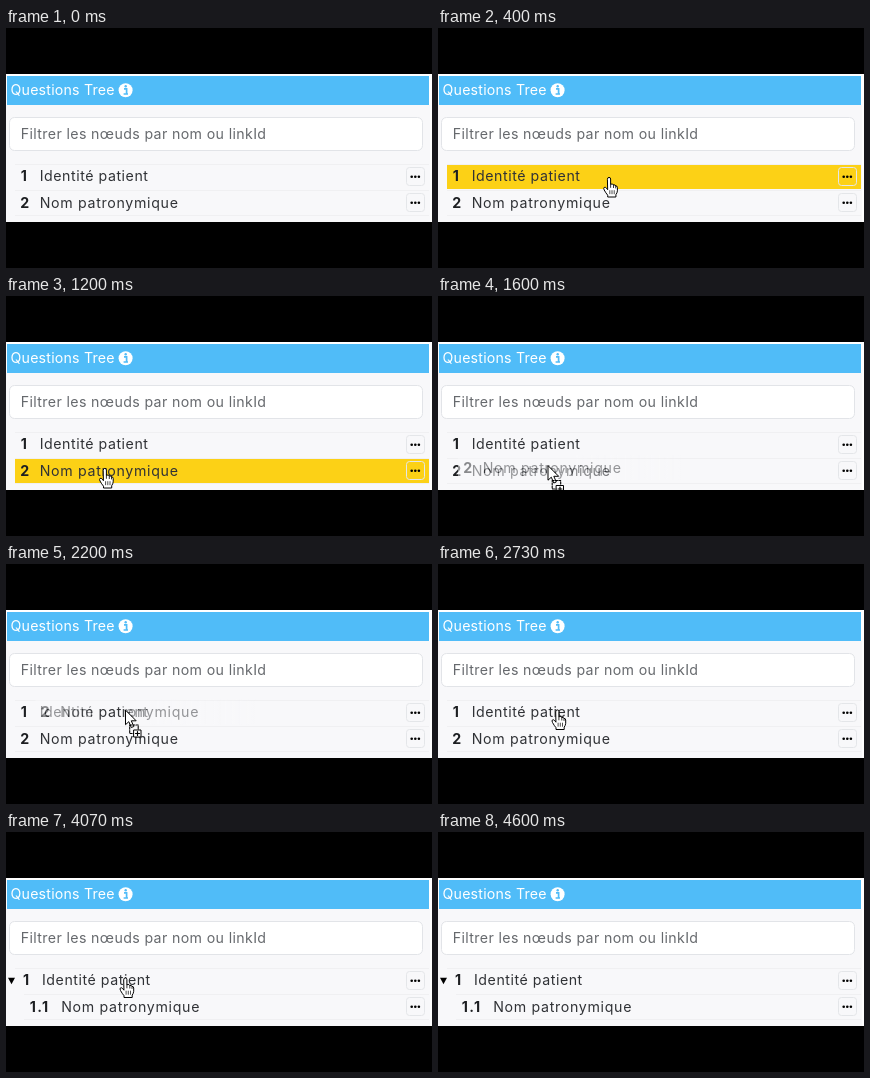
These frames come from a looping animation (426 px wide and 240 px high, 4670 ms). An HTML page:

```html
<!DOCTYPE html>
<html lang="fr">
<head>
<meta charset="utf-8">
<title>Questions Tree</title>
<style>
html, body { margin: 0; width: 100%; height: 100%; overflow: hidden; background: #000; }
svg { display: block; width: 100vw; height: 100vh; }
text { font-family: Inter, "Open Sans", sans-serif; font-size: 14.2px; fill: #303236; white-space: pre; }
.num { font-weight: 700; fill: #1d1f22; }
.first { letter-spacing: .54px; }
.second { letter-spacing: .68px; }
.tip { font: 11.3px "Liberation Sans", Arial, sans-serif; fill: #fff; stroke: #fff; stroke-width: .25px; }
.line { stroke: #f0f0f2; fill: none; }
.button { fill: none; stroke: #e4e6e9; }
.pen { fill: #fff; stroke: #000; stroke-linejoin: round; stroke-linecap: round; }
</style>
</head>
<body>
<svg viewBox="0 0 426 240">
  <defs>
    <clipPath id="panel"><rect y="46" width="426" height="148"/></clipPath>
    <linearGradient id="fade">
      <stop offset="0" stop-color="#f8f8fa"/>
      <stop offset=".5" stop-color="#f8f8fa"/>
      <stop offset="1" stop-color="#f8f8fa" stop-opacity="0"/>
    </linearGradient>
    <g id="more">
      <rect class="button" x="400.5" y="139.5" width="18" height="18" rx="3"/>
      <circle cx="405.7" cy="148.8" r="1.3"/>
      <circle cx="409.3" cy="148.8" r="1.3"/>
      <circle cx="412.9" cy="148.8" r="1.3"/>
    </g>
  </defs>
  <rect width="426" height="240"/>
  <g clip-path="url(#panel)">
    <rect y="46" width="426" height="148" fill="#fff"/>
    <rect y="77" width="424" height="117" fill="#f8f8fa"/>
    <rect x="1" y="48" width="422" height="29" fill="#50bcf8"/>
    <text x="4.5" y="67" style="fill:#fff;letter-spacing:.2px">Questions Tree</text>
    <circle cx="119.6" cy="62.3" r="7" fill="#fff"/>
    <path d="M118 60.8h2.6v5M117.6 66h4.4" fill="none" stroke="#50bcf8" stroke-width="1.7"/>
    <circle cx="119.7" cy="58.2" r="1.2" fill="#50bcf8"/>
    <rect x="3.5" y="89.5" width="413" height="33" rx="5" fill="#fff" stroke="#e2e4e8"/>
    <text x="14.8" y="110.5" style="fill:#66696d;letter-spacing:.36px">Filtrer les nœuds par nom ou linkId</text>

    <rect id="hover" x="9" width="414" height="25" fill="#fcd116"/>
    <path id="lines" class="line"/>
    <path id="caret" d="M2 145.7h7l-3.5 6.6z"/>
    <text id="num1" class="num" y="153.3">1</text>
    <text id="name1" class="first" y="153.3">Identité patient</text>
    <text id="num2" class="num" y="179.5"></text>
    <text id="name2" class="second" y="179.5">Nom patronymique</text>
    <use href="#more"/>
    <use href="#more" y="26"/>

    <g id="ghost" opacity=".5">
      <rect x="9" y="162" width="225" height="25" fill="url(#fade)"/>
      <text class="num" x="14.3" y="179.5">2</text>
      <text class="second" x="33.7" y="179.5">Nom patronymique</text>
    </g>

    <g id="tip">
      <rect x="172.5" y="168.5" width="87" height="19.5" rx="3.5" fill="#636363"/>
      <text class="tip" x="179.3" y="182">Identité patient</text>
    </g>

    <g id="hand" class="pen">
      <path d="M-1.8 1Q-1.8-.6-.2-.6T1.4 1V6.2Q3.9 5.4 4.3 7Q6.2 6.3 6.5 8Q8.2 7.7 8.2 9.5V12.8Q8 15 6.7 16.6V19H-1.5V17.2Q-3.4 15-5 12Q-6 10.2-5 9.4Q-3.9 8.8-2.7 10.2L-1.8 11.4Z"/>
      <path d="M1.4 6.2V9.4M4.3 7V9.6M6.5 8V10" fill="none" stroke-width=".8"/>
      <path d="M.6 12.6V15.8M2.8 12.6V15.8M5 12.6V15.8" fill="none" stroke-width=".7"/>
    </g>
    <g id="arrow" class="pen">
      <path d="M0 0V14.2L3.3 11.2 5.8 17 8.3 16 5.8 10.3H10.3Z"/>
      <path d="M4.2 14.5h8.5v8.5h-8.5z" fill="none" stroke-width="1.1" stroke-dasharray="2 1.3"/>
      <path d="M8.5 19.5h7v7h-7z" stroke-width="1"/>
      <path d="M10 23h4M12 21v4" stroke-width="1.2"/>
    </g>
  </g>
</svg>
<script>
const LOOP = 4670, STEP = 1000 / 15;
const GRAB = [99, 173];
// Pointer path: time, x, y
const PATH = [
  [67, 205, 198], [200, 172, 150], [667, 170, 150], [800, 101.5, 170],
  [930, 99, 173], [1330, 99, 173], [1600, 110, 170], [2000, 119.5, 146.5],
  [4130, 119.5, 146.5], [4400, 135, 198]
];
const $ = id => document.getElementById(id);
const set = (id, attrs) => {
  for (const key in attrs) $(id).setAttribute(key, attrs[key]);
};
const show = (id, on) => set(id, { visibility: on ? "visible" : "hidden" });
const within = (t, a, b) => t >= a && t < b;
const move = (dx, dy) => ({ transform: `translate(${dx} ${dy})` });

function pointer(t) {
  if (t <= PATH[0][0]) return PATH[0].slice(1);
  const i = PATH.findIndex(p => p[0] > t);
  if (i < 0) return PATH[PATH.length - 1].slice(1);
  const [a, b] = [PATH[i - 1], PATH[i]];
  const k = (t - a[0]) / (b[0] - a[0]);
  const ease = k * k * (3 - 2 * k);
  return [1, 2].map(n => a[n] + (b[n] - a[n]) * ease);
}

function draw(time) {
  const t = Math.floor((time % LOOP + 4) / STEP) * STEP;
  const [x, y] = pointer(t);
  const drag = within(t, 1390, 2600);
  const nested = t >= 3130;

  set("num1", { x: nested ? 17 : 14.7 });
  set("name1", { x: nested ? 36 : 33.7 });
  set("num2", { x: nested ? 23.7 : 14.3, "letter-spacing": nested ? 1.4 : 0 });
  set("name2", { x: nested ? 55.2 : 33.7 });
  $("num2").textContent = nested ? "1.1" : "2";
  const left = nested ? 18 : 9;
  set("lines", { d: `M9 136.5H423M${left} 162.5H423M${left} 187.5H423` });
  show("caret", nested);

  set("hover", { y: t < 850 ? 136 : 162 });
  show("hover", within(t, 190, 1320));
  show("tip", within(t, 660, 900));

  set("ghost", move(x - GRAB[0], y - GRAB[1]));
  set("arrow", move(x, y));
  set("hand", move(x, y));
  show("ghost", drag);
  show("arrow", drag);
  show("hand", !drag && within(t, 67, 4400));
}

const start = performance.now();
function tick() {
  draw(performance.now() - start);
  requestAnimationFrame(tick);
}
draw(0);
requestAnimationFrame(tick);
</script>
</body>
</html>
```
